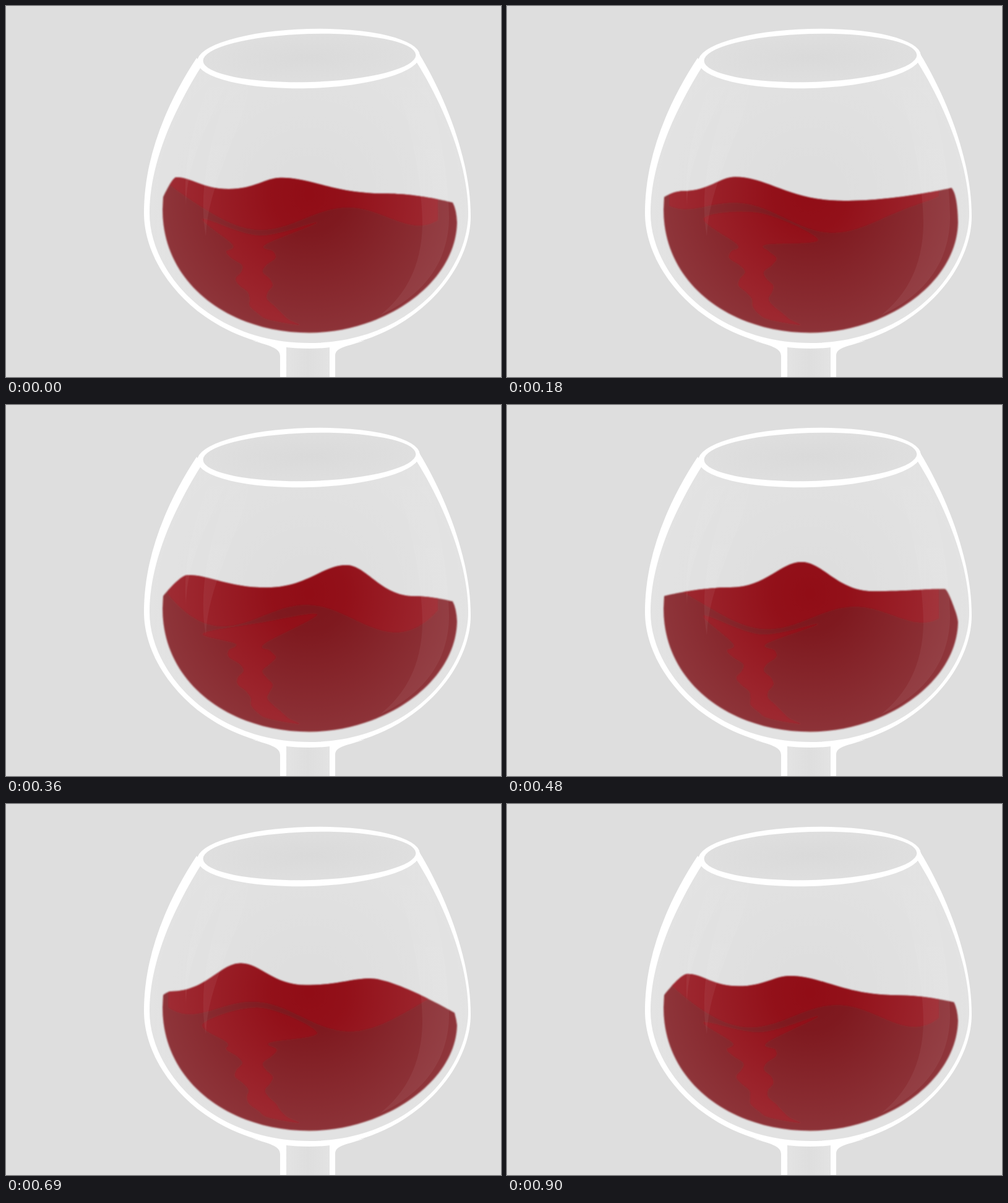
Recreate the animation shown at these times as an HTML page. Size 800 px wide and 600 px high, loop 0.93 s.

```html
<!DOCTYPE html>
<html lang="en">
<head>
<meta charset="utf-8">
<title>Swirling wine</title>
<style>
  html, body { margin: 0; width: 100%; height: 100%; overflow: hidden; background: #dedede; }
  svg { display: block; width: 100vw; height: 100vh; }
</style>
</head>
<body>
<svg viewBox="0 0 800 600">
  <defs>
    <clipPath id="inside"><path id="level"/></clipPath>
    <filter id="soft" filterUnits="userSpaceOnUse" x="230" y="220" width="520" height="330">
      <feGaussianBlur stdDeviation=".9"/>
    </filter>
    <radialGradient id="sheen" gradientUnits="userSpaceOnUse" cx="490" cy="305" r="250">
      <stop offset="0" stop-color="#fff" stop-opacity="0"/>
      <stop offset=".25" stop-color="#fff" stop-opacity=".015"/>
      <stop offset="1" stop-color="#fff" stop-opacity=".14"/>
    </radialGradient>
    <radialGradient id="mouth">
      <stop offset="0" stop-color="#dadada"/>
      <stop offset="1" stop-color="#dfdfdf"/>
    </radialGradient>
    <linearGradient id="stem">
      <stop offset="0" stop-color="#e4e4e4"/>
      <stop offset=".5" stop-color="#dedede"/>
      <stop offset="1" stop-color="#e4e4e4"/>
    </linearGradient>
    <linearGradient id="streak" gradientUnits="userSpaceOnUse" x1="0" y1="125" x2="0" y2="240">
      <stop offset="0" stop-color="#fff" stop-opacity=".015"/>
      <stop offset="1" stop-color="#fff" stop-opacity=".055"/>
    </linearGradient>
  </defs>

  <rect x="448" y="550" width="80" height="50" fill="url(#stem)"/>

  <g filter="url(#soft)">
    <g clip-path="url(#inside)">
      <rect x="240" y="230" width="500" height="310" fill="#7d181d"/>
      <g fill="#910f16"><path id="top"/><path id="glint"/></g>
    </g>
  </g>

  <path fill="url(#sheen)" d="M318 94C270 170 232 255 232 335C232 430 330 545 490 545C650 545 747 430 747 335C747 255 707 160 663 90Z"/>
  <g fill="url(#streak)">
    <path d="M328 126C303 190 285 260 291 322C291 260 325 190 356 128Z"/>
    <path d="M362 128C328 220 310 300 323 372C326 290 375 215 393 134Z"/>
    <path d="M632 125C660 215 673 300 673 355C671 420 648 465 605 500C680 465 716 410 716 340C714 260 700 195 680 125Z"/>
  </g>

  <ellipse cx="490" cy="84" rx="176" ry="44" fill="url(#mouth)" transform="rotate(-1.6 490 84)"/>
  <g fill="#fff" fill-rule="evenodd">
    <path d="M308 84C255 165 223 250 223 335C223 435 330 554 490 554C640 554 751 440 751 340C751 255 715 155 667 76L663 90C707 160 747 255 747 335C747 430 650 545 490 545C330 545 232 430 232 335C232 255 270 170 318 94Z"/>
    <path d="M398 541C425 549 443 553 443 566V600H453V551Z"/>
    <path d="M580 541C550 551 532 552 532 566V600H523V551Z"/>
    <path transform="rotate(-1.6 489 85)" d="M309 85a180 48 0 0 1 360 0a180 48 0 0 1-360 0ZM318.500 84a172 39 0 0 0 344 0a172 39 0 0 0-344 0Z"/>
  </g>
</svg>
<script>
const LOOP = 930, STEP = 30, TAU = 2 * Math.PI;
const $ = id => document.getElementById(id);

// Two crests cross the glass from right to left: time, x, y.
// They start and finish beyond the walls.
const crests = [
  [[240, 780, 308], [360, 770, 311], [600, 645, 284], [900, 457, 278],
   [1290, 293, 275], [1530, 200, 296], [1650, 140, 300]],
  [[780, 900, 300], [930, 780, 255], [1050, 770, 284], [1170, 670, 269], [1290, 550, 259],
   [1530, 402, 249], [1710, 357, 266], [1860, 275, 277], [2160, 150, 290]]
];
// Height of the wine at the right wall: time, y.
const rightWall = [[0, 318], [120, 284], [240, 304], [600, 345], [LOOP, 318]];

// Values of a key list at time t, or nothing outside its span.
function at(keys, t) {
  const i = keys.findIndex((k, n) => n && t >= keys[n - 1][0] && t <= k[0]);
  if (i < 0) return;
  const a = keys[i - 1], b = keys[i], u = (t - a[0]) / (b[0] - a[0]);
  return a.slice(1).map((v, n) => v + (b[n + 1] - v) * u);
}

// Points of the surface, each with its handle length: sharp crests, wide troughs.
function surface(t) {
  const tops = [];
  for (const keys of crests)
    for (let n = 0; n < 3; n++) {
      const p = at(keys, t + n * LOOP);
      if (p) tops.push([...p, .3]);
    }
  tops.sort((a, b) => a[0] - b[0]);

  // A trough lies midway between two crests, deeper when they are far apart.
  const dips = tops.slice(1).map(([x, y], i) => {
    const [px, py] = tops[i];
    return [(x + px) / 2, (y + py) / 2 + .11 * (x - px), .5];
  });

  const [ry] = at(rightWall, t);
  const left = [254, 309, 0], right = [722 + .15 * (ry - 318), ry, 0];
  const inner = [...tops, ...dips]
    .filter(p => p[0] > left[0] + 8 && p[0] < right[0] - 8)
    .sort((a, b) => a[0] - b[0]);
  return [left, ...inner, right];
}

function drawLevel(t) {
  const p = surface(t), [lx, ly] = p[0], [rx, ry] = p[p.length - 1];
  let d = `M${lx} ${ly}`;
  for (let i = 1; i < p.length; i++) {
    const [x0, y0, h0] = p[i - 1], [x1, y1, h1] = p[i], w = x1 - x0;
    d += `C${x0 + h0 * w} ${y0} ${x1 - h1 * w} ${y1} ${x1} ${y1}`;
  }
  d += `Q728 ${ry + 11} 729 ${Math.max(350, ry + 20)}` +
    `C727 450 610 528.500 490 528.500C362 528.500 ${lx - 1} 450 ${lx - 1} ${ly + 20}Z`;
  $("level").setAttribute("d", d);
}

// Lower edge of the bright wine: a wave running right, lifted at the walls.
const SPEED = .64, WAVE = SPEED * LOOP / 2;
function front(x, t) {
  const phase = TAU * (x - 342 - SPEED * (t - 130)) / WAVE;
  return 338 - 21 * Math.cos(phase) + .04 * (x - 330) - 25 * ((x - 480) / 215) ** 6;
}

function drawTop(t) {
  let d = "M262 230";
  for (let x = 262; x <= 698; x += 4) d += `L${x} ${front(x, t)}`;
  $("top").setAttribute("d", d + "V230Z");
}

// Closed smooth curve through all points.
function blob(p) {
  const n = p.length, pt = i => p[(i + n) % n];
  let d = "M" + p[0];
  for (let i = 0; i < n; i++) {
    const [a, b, c, e] = [pt(i - 1), pt(i), pt(i + 1), pt(i + 2)];
    const h = j => [b[j] + (c[j] - a[j]) / 6, c[j] - (e[j] - b[j]) / 6];
    const [x1, x2] = h(0), [y1, y2] = h(1);
    d += `C${x1} ${y1} ${x2} ${y2} ${c}`;
  }
  return d + "Z";
}

// The reflection hangs below the front and ripples down to the bottom.
function drawGlint(t) {
  const tops = [[318, 18], [410, 9], [503, 14]].map(([x, gap]) => [x, front(x, t) + gap]);
  const left = [], right = [], bob = 6 * Math.sin(TAU * t / LOOP);
  for (let y = 386; y <= 510; y += 11) {
    const v = (y - 380) / 134;
    const mid = 395 + 12 * v + 46 * v ** 6;
    const half = 17 + 18 * (1 - v) ** 2;
    const ripple = c => 11 * (1 - v * v) * Math.cos(TAU * (y - c - bob) / 45);
    left.unshift([mid - half - ripple(400), y]);
    right.push([mid + half + ripple(405), y]);
  }
  $("glint").setAttribute("d", blob([...tops, ...right, [474, 516], ...left]));
}

function tick(now) {
  const t = Math.floor(now % LOOP / STEP) * STEP;
  drawLevel(t);
  drawTop(t);
  drawGlint(t);
  requestAnimationFrame(tick);
}
tick(performance.now());
</script>
</body>
</html>
```
